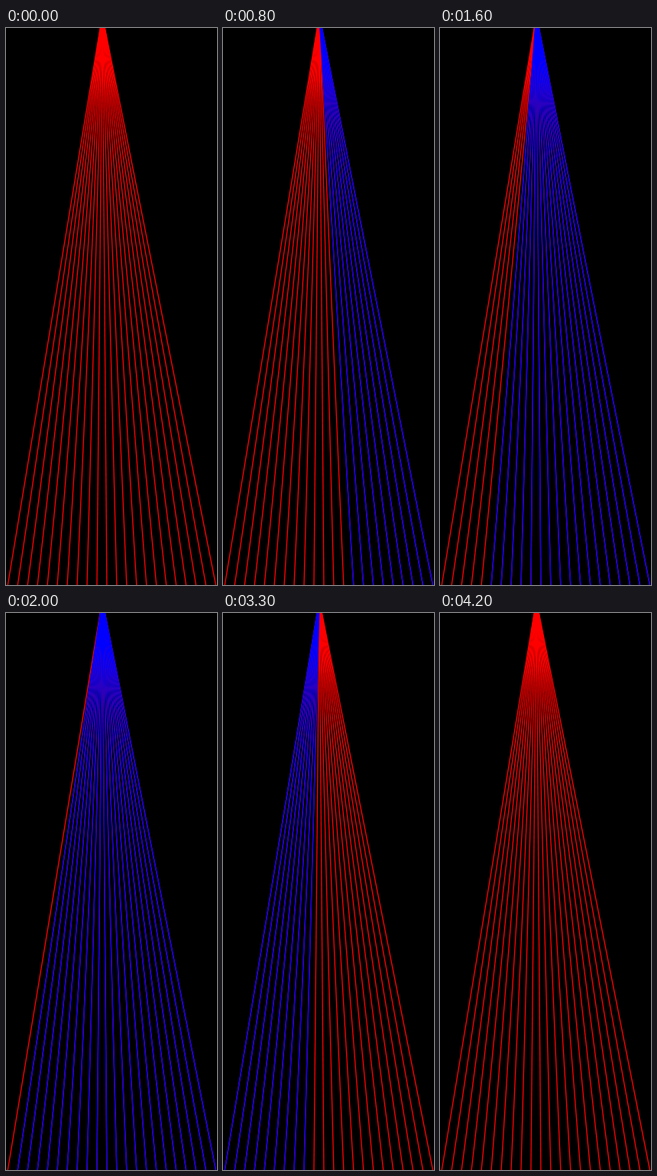
An HTML page with a canvas that plays this animation: 276 by 727 pixels, repeating every 4.7 s.

```html
<!DOCTYPE html>
<html lang="en">
<head>
<meta charset="utf-8">
<title>Fan of lines</title>
<style>
  html, body { margin: 0; height: 100%; overflow: hidden; background: #000; }
  canvas { display: block; }
</style>
</head>
<body>
<canvas id="stage" width="276" height="727"></canvas>
<script>
const ctx = document.getElementById('stage').getContext('2d');
const WIDTH = 276, HEIGHT = 727;
const LINES = 22, STEP = 100, SWEEP = 21, LOOP = 4700;
const APEX = { x: 126, y: -17 };

function drawRay(index, color, width) {
  ctx.strokeStyle = color;
  ctx.lineWidth = width;
  ctx.beginPath();
  ctx.moveTo(APEX.x, APEX.y);
  ctx.lineTo(2.3 + index * 12.96, HEIGHT);
  ctx.stroke();
}

// Blue sweeps in from the right, then red follows; the outer two rays switch together.
function isBlue(index, step) {
  const start = SWEEP - Math.min(index, SWEEP - 1);
  return step >= start && step < start + SWEEP;
}

function draw(now) {
  const step = Math.min(Math.floor(now % LOOP / STEP), 2 * SWEEP);
  ctx.fillStyle = '#000';
  ctx.fillRect(0, 0, WIDTH, HEIGHT);
  for (let i = 0; i < LINES; i++) drawRay(i, '#f00', 1.35);
  for (let i = 0; i < LINES; i++) {
    if (isBlue(i, step)) drawRay(i, '#00f', 1.5);
  }
}

const origin = performance.now();
function tick() {
  draw(performance.now() - origin);
  requestAnimationFrame(tick);
}
tick();
</script>
</body>
</html>
```
